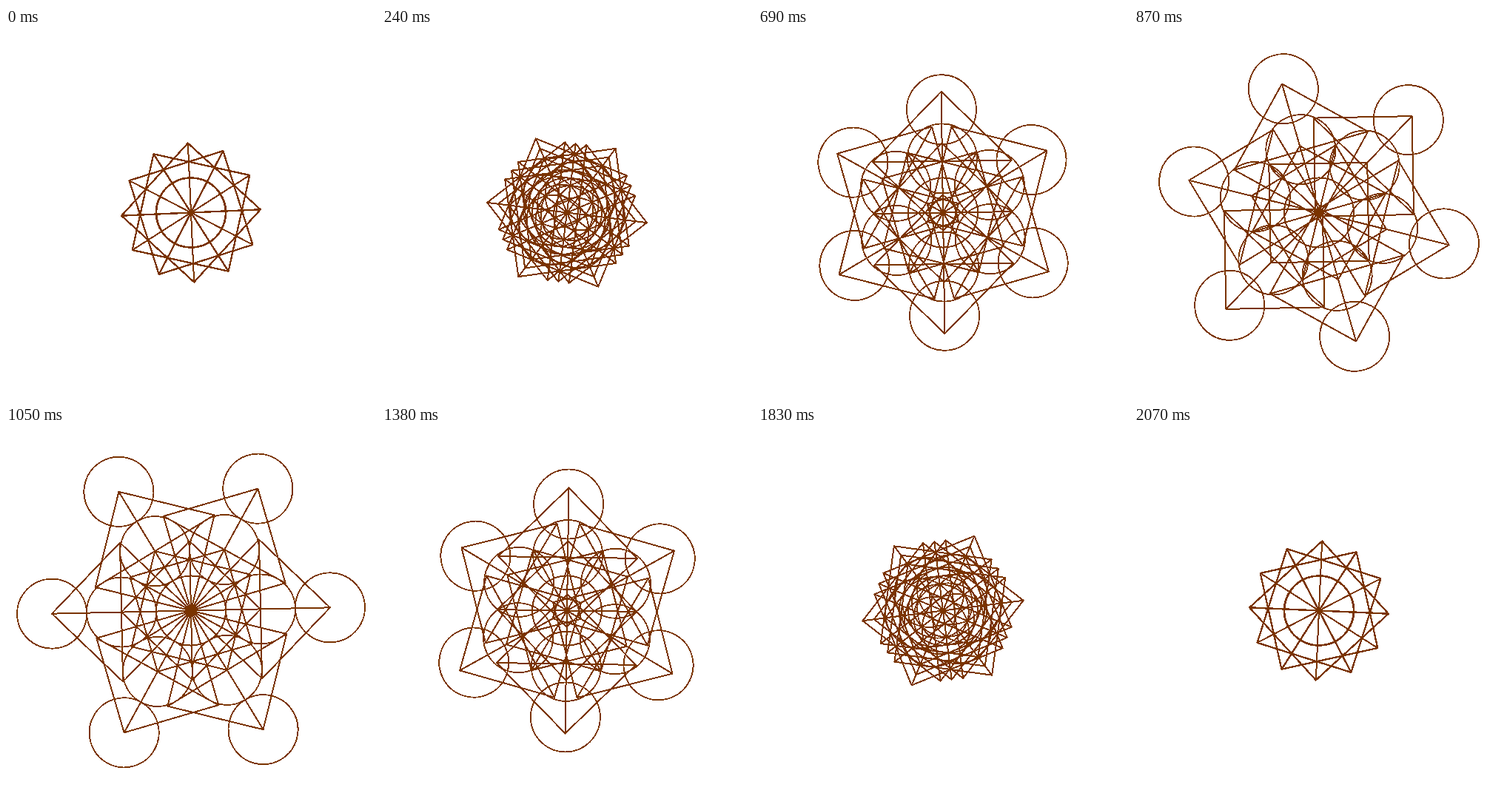
Write an HTML page that moves like this. It is 500 px wide and 500 px high and loops after 2100 ms.

```html
<!DOCTYPE html>
<html lang="en">
<head>
<meta charset="utf-8">
<title>Rotating rosette</title>
<style>
html, body { margin: 0; width: 100%; height: 100%; overflow: hidden; background: #fff; }
svg { display: block; fill: none; stroke: #7a3300; shape-rendering: crispEdges; }
</style>
</head>
<body>
<svg width="500" height="500" viewBox="0 0 500 500">
  <defs>
    <path id="square" d="M94 0L0 94L-94 0L0 -94ZM-94 0H94M0 -94V94" stroke-width="2" stroke-linejoin="round"/>
    <circle id="ring" r="47" stroke-width="1.8"/>
  </defs>
  <g id="rosette"></g>
</svg>
<script>
const STEP = 30, STEPS = 70, PEAK = 36, END = 71;
const UNITS = 6, REACH = 94;
const rosette = document.getElementById('rosette');

const smooth = x => x * x * (3 - 2 * x);
const quad = x => x < 0.5 ? 2 * x * x : 1 - 2 * (1 - x) ** 2;

const part = (id, x) => `<use href="#${id}" x="${x}"/>`;

// A still square and ring in the middle, with one square and two rings moving out.
function unit(i, far, near) {
  return `<g transform="rotate(${i * 360 / UNITS})">` +
    part('square', 0) + part('ring', 0) +
    part('square', far) + part('ring', 2 * far) +
    part('ring', near) + '</g>';
}

function draw(k) {
  const spread = k < PEAK ? k / PEAK : (END - k) / (END - PEAK);
  const far = REACH * smooth(spread), near = REACH * quad(spread);
  rosette.setAttribute('transform', `translate(250 249.5) rotate(${30 - 180 * k / END})`);
  rosette.innerHTML = Array.from({ length: UNITS }, (_, i) => unit(i, far, near)).join('');
}

const start = performance.now();
function tick() {
  const t = Math.max(0, performance.now() - start);
  draw(Math.floor(t / STEP) % STEPS + 1);
  requestAnimationFrame(tick);
}
tick();
</script>
</body>
</html>
```
